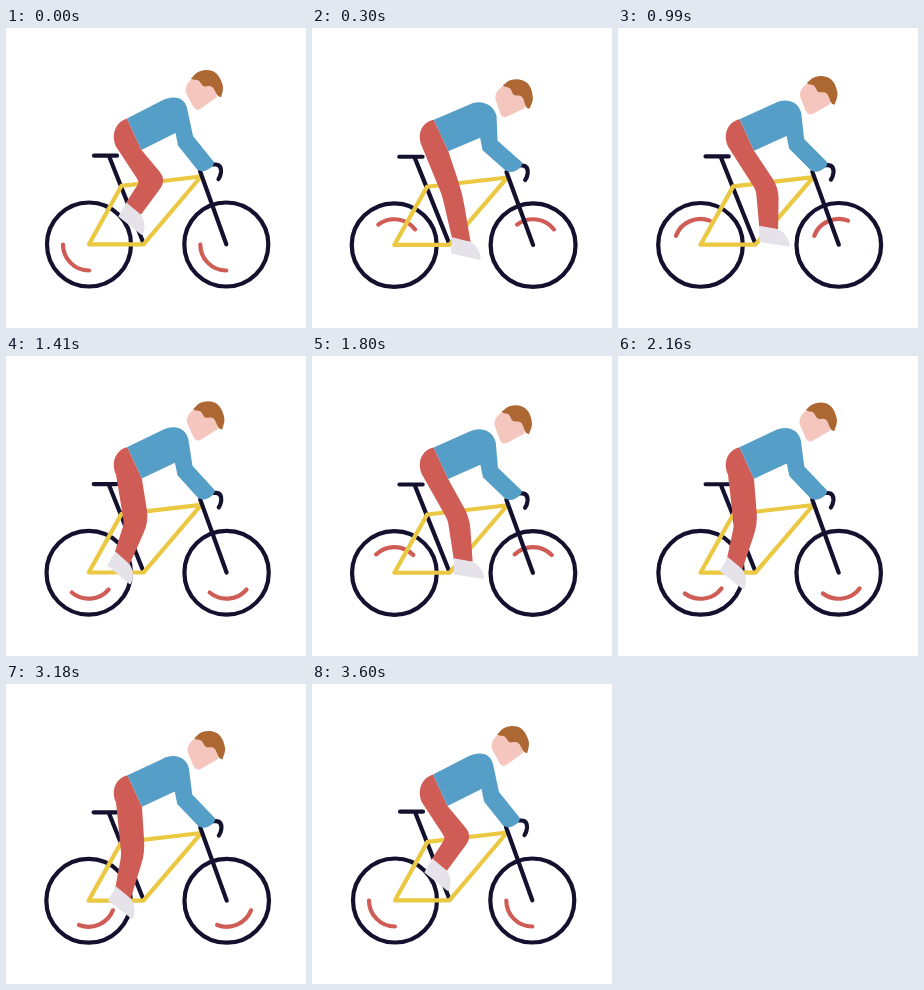
These frames come from a looping animation (300x300 px, 3.63 s). An HTML page:

```html
<!DOCTYPE html>
<html lang="en">
<head>
<meta charset="utf-8">
<title>Cyclist</title>
<style>
  html, body { margin: 0; width: 100%; height: 100%; overflow: hidden; background: #fff; }
  svg { display: block; width: 100vw; height: 100vh; }
  .line { fill: none; stroke-width: 4.2; stroke-linecap: round; stroke-linejoin: round; }
  .navy { stroke: #14112f; }
  .yellow { stroke: #ebc842; }
  .red { stroke: #cf5c55; }
</style>
</head>
<body>
<svg viewBox="0 0 300 300">
  <g id="bike" class="line">
    <circle class="navy" cx="83" cy="216.5" r="42"/>
    <circle class="navy" cx="220.3" cy="216.5" r="42"/>
    <path class="red spin" data-x="83" d="M-26 0A26 26 0 0 0 0 26"/>
    <path class="red spin" data-x="220.3" d="M-26 0A26 26 0 0 0 0 26"/>
    <path class="navy" d="M88 127.7H111M103 128L137 214"/>
    <path class="yellow" d="M83 216.3H137.5L195 148.5L115.5 157.8Z"/>
    <path class="navy" d="M194 143L220.3 216.3M204 136.5H210Q215.5 137 215 144Q214.5 148.5 212.5 151"/>
  </g>
  <path id="leg" fill="#cf5c55"/>
  <path id="shoe" fill="#e6e2ea" d="M-9.5 -1L9.5 0C16 2 21.5 8 22.7 14Q23 15.8 21 15.7L-7.5 15Z"/>
  <path id="torso" fill="#559ec8"/>
  <g id="head">
    <path fill="#f5c6bd" d="M187 50C180 55 178 62 181 67L187.5 79Q190.5 83.5 195 80.5L211 69L207 52Z"/>
    <path fill="#ad6733" d="M185 50.5C188 49 188 43.5 199 42C208 41.5 213 46 216 55C218 60 216.5 64 215.3 69C211.5 69 210.5 66 208.8 62.5C206.5 57.5 204 57.5 200.5 58.3C196 59.5 195.5 55 193 52.8C190.5 51 187.5 53 185 50.5Z"/>
  </g>
</svg>
<script>
const STEP = 30, LOOP = 3630, SLOW = 2730, END = 3600;
const get = id => document.getElementById(id);
const bike = get('bike'), leg = get('leg'), shoe = get('shoe');
const torso = get('torso'), head = get('head');
const spins = document.querySelectorAll('.spin');

const mix = (a, b, k) => a + (b - a) * k;
const toward = (p, q, k) => [mix(p[0], q[0], k), mix(p[1], q[1], k)];
const pt = p => p.map(v => v.toFixed(2)).join(' ');
const wave = (p, c, a, b, d = 0) => c + a * Math.cos(p) + b * Math.sin(p) + d * Math.cos(2 * p);

// Steady pace, then one slow half turn; 'first' is the angle where it slows
function turn(t, first) {
  return t < SLOW ? first * t / SLOW : mix(first, 1440, (t - SLOW) / (END - SLOW));
}

// Each joint sinks by its own amount as s goes from 0 (up) to 1 (down)
function drawTorso(s) {
  const joint = (dx, dy) => (x, y) => pt([x + dx * s, y + dy * s]);
  const hip = joint(1, 1.5), back = joint(3, 4), shoulder = joint(4, 9);
  const elbow = joint(-1.6, 5.5), hand = joint(2.7, 1);
  torso.setAttribute('d',
    `M${hip(121, 90.5)}L${back(155, 73)}` +
    `C${back(165, 67.5)} ${shoulder(178, 67.5)} ${shoulder(181, 80)}` +
    `L${elbow(187, 108)}L${hand(207.5, 133.5)}` +
    `C${hand(210, 137.5)} ${hand(200, 144.5)} ${hand(195, 143)}` +
    `L${hand(191.5, 142)}L${elbow(172, 117.5)}L${elbow(169.5, 105)}L${hip(135.5, 122)}Z`);
}

function drawLeg(p, s) {
  const ankle = [wave(p, 133.7, -6.4, 16.3), wave(p, 202, -19.2, -6.1, -1.8)];
  const knee = [wave(p, 137.4, 6.4, 11.9), wave(p, 162.4, -8.7, -5.1, -1.7)];
  const tilt = wave(p, 26, 6.7, -14.3, 4.2);
  const r = tilt * Math.PI / 180;
  const cuff = x => [ankle[0] + x * Math.cos(r), ankle[1] + x * Math.sin(r)];
  const heel = cuff(-9.5), toe = cuff(9.5);
  const front = [knee[0] + 12.8 + 4 * Math.cos(p), knee[1]];
  const back = [knee[0] - 10.5, knee[1] + 2];
  const hip = [121 + s, 90.5 + 1.5 * s], seat = [110, 118.5], lap = [135.5 + s, 122 + 1.5 * s];
  leg.setAttribute('d',
    `M${pt(hip)}C110 94 104.5 106 ${pt(seat)}` +
    `L${pt(toward(back, seat, 0.1))}Q${pt(back)} ${pt(toward(back, heel, 0.1))}` +
    `L${pt(heel)}L${pt(toe)}` +
    `L${pt(toward(front, toe, 0.26))}Q${pt(front)} ${pt(toward(front, lap, 0.26))}` +
    `L${pt(lap)}Z`);
  shoe.setAttribute('transform', `translate(${pt(ankle)}) rotate(${tilt})`);
}

function draw(t) {
  const p = turn(t, 1260) * Math.PI / 180;
  const s = (1 - Math.cos(p)) / 2;
  const roll = turn(t, 1298);
  bike.setAttribute('transform',
    `translate(152 ${216 + 0.7 * s}) scale(${1 + 0.013 * s} ${1 - 0.006 * s}) translate(-152 -216)`);
  spins.forEach(el => el.setAttribute('transform', `translate(${el.dataset.x} 216.5) rotate(${roll})`));
  drawLeg(p, s);
  drawTorso(s);
  head.setAttribute('transform', `translate(${4.5 * s} ${10.5 * s}) rotate(${12 * s} 200 60)`);
}

const start = performance.now();
function tick() {
  const t = (performance.now() - start) % LOOP;
  draw(Math.min(Math.floor(t / STEP) * STEP, END));
  requestAnimationFrame(tick);
}
draw(0);
requestAnimationFrame(tick);
</script>
</body>
</html>
```
